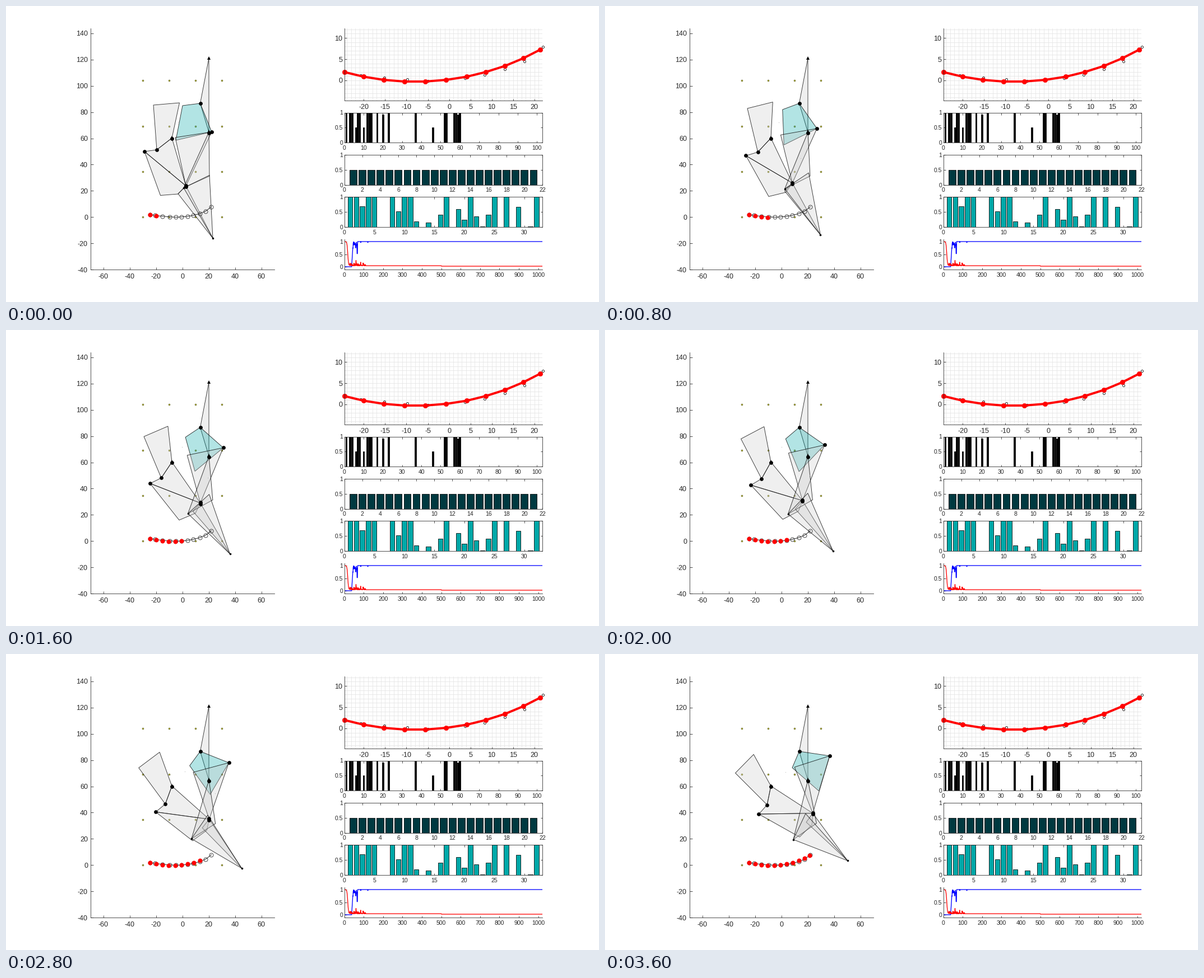
Recreate the animation shown at these times as a matplotlib script. Size 1058x529 px, loop 4000 ms.

```python
import numpy as np
import matplotlib.pyplot as plt
from matplotlib.animation import FuncAnimation
from matplotlib.patches import Polygon

W, H, DPI = 1058, 529, 100
PX = 72 / DPI  # points per pixel
INK = "#262626"
TEAL = (0, 0.66, 0.66)

plt.rcParams.update({
    "font.family": "Liberation Sans",
    "axes.unicode_minus": False,
    "axes.edgecolor": INK,
    "axes.linewidth": 0.8 * PX,
    "axes.axisbelow": True,
})
fig = plt.figure(figsize=(W / DPI, H / DPI), dpi=DPI, facecolor="white")


def panel(box, xlim, ylim, xticks, yticks, size, pads, framed=True, tick=3.5):
    """Axes with pixel bounds (left, top, right, bottom)."""
    l, t, r, b = box
    ax = fig.add_axes([l / W, 1 - b / H, (r - l) / W, (b - t) / H])
    ax.set(xlim=xlim, ylim=ylim)
    ax.set_xticks(xticks, [f"{v:g}" for v in xticks])
    ax.set_yticks(yticks, [f"{v:g}" for v in yticks])
    ax.tick_params(direction="in", length=tick * PX, width=0.8 * PX, color=INK,
                   labelcolor=INK, labelsize=size * PX, top=framed, right=framed)
    ax.tick_params(axis="x", pad=pads[0] * PX)
    ax.tick_params(axis="y", pad=pads[1] * PX)
    ax.spines[["top", "right"]].set_visible(framed)
    return ax


# Path of the foot and the wanted curve
path = np.array([(-24.6, 1.97), (-20, 0.86), (-15.3, 0.13), (-10.5, -0.26),
                 (-5.6, -0.26), (-0.7, 0.13), (4.1, 0.86), (8.6, 1.97),
                 (13.1, 3.4), (17.4, 5.2), (21.4, 7.24)])
goal = np.array([(-24.6, 1.97), (-20.7, 1.2), (-15.2, 0.65), (-9.8, 0.2),
                 (-4.9, -0.1), (-0.8, 0.1), (3.75, 0.5), (8.3, 1.3),
                 (13.1, 2.6), (17.7, 4.5), (22, 7.9)])

# Right column
fit = panel((603.5, 40, 957, 169), (-24.6, 21.9), (-4.74, 12.24),
            range(-20, 21, 5), (0, 5, 10), 12.5, (6.5, 3.5), framed=False)
fit.set_xticks(range(-24, 22), minor=True)
fit.set_yticks(range(-4, 13), minor=True)
fit.tick_params(which="minor", length=0)
fit.grid(which="both", color="#e4e4e4", lw=0.8 * PX)
fit.plot(*goal[1:].T, "o", ms=4 * PX, mfc="none", mec="k", mew=0.8 * PX, clip_on=False)
fit.plot(*path.T, "o-", color="red", lw=4 * PX, ms=8.5 * PX, mec="red",
         mew=0.5 * PX, clip_on=False)


def bars(box, xmax, xticks, heights, color, width=0.8):
    ax = panel(box, (0, xmax), (0, 1), xticks, (0, 0.5, 1), 10.4, (5, 2.5))
    ax.bar(list(heights), list(heights.values()), width, color=color,
           edgecolor="k", lw=0.8 * PX)


flags = dict.fromkeys((1, 3, 4, 7, 8, 12, 13, 14, 17, 23, 37, 52, 53, 57, 58, 60), 1)
flags.update({6: 0.5, 10: 0.5, 46: 0.5, 20: 0.94, 59: 0.94})
bars((603.5, 190.5, 957, 244), 102.8, range(0, 101, 10), flags, "k")
bars((603.5, 266, 957, 319.5), 22, range(0, 23, 2),
     dict.fromkeys(range(1, 22), 0.5), (0, 0.225, 0.25))
genes = dict.fromkeys((1, 2, 4, 5, 8, 10, 11, 17, 21, 25, 27, 32), 1)
genes.update({3: 0.68, 9: 0.52, 12: 0.18, 14: 0.15, 16: 0.4, 19: 0.6, 20: 0.25,
              22: 0.35, 23: 0.01, 24: 0.4, 29: 0.67, 31: 0.02})
bars((603.5, 341, 957, 395), 33, range(0, 31, 5), genes, TEAL)

log = panel((603.5, 416.5, 957, 470.5), (0, 1021), (-0.1, 1.1),
            range(0, 1001, 100), (0, 0.5, 1), 10.4, (5, 2.5), framed=False)
rng = np.random.default_rng(4)
n = np.arange(1021)
score = np.clip((n - 38) / 8, 0, 1)
early = (n > 44) & (n < 68)
score[early] -= 0.15 * rng.random(early.sum())
score[[59, 60]], score[[66, 67, 68]], score[[85, 121, 122]] = 0.75, 0.52, 0.96
error = 0.04 + 0.96 / (1 + np.exp((n - 18) / 2))
rough = (n > 24) & (n < 112)
error[rough] += 0.11 * rng.random(rough.sum()) ** 3
error[[60, 61]], error[[84, 85]], error[[97]] = 0.25, 0.18, 0.15
error[n > 500] -= 0.018
log.plot(n, score, color="blue", lw=1.3 * PX)
log.plot(n, error, color="red", lw=1.3 * PX)

# Left plot
main = panel((150.5, 40, 479, 471), (-70, 70), (-40, 143.8),
             range(-60, 61, 20), range(-40, 141, 20), 12.5, (7, 4.5),
             framed=False, tick=4.5)
gx, gy = np.meshgrid((-30, -10, 10, 30), (0, 34.7, 69.3, 104))
main.plot(gx.ravel(), gy.ravel(), "o", ms=2.6 * PX, mfc="#e0e040", mec="#55551a",
          mew=0.8 * PX)

# Linkage, in stage pixels with y down
stage = fig.add_axes([0, 0, 1, 1])
stage.set(xlim=(0, W), ylim=(H, 0))
stage.axis("off")

TOP, B, C, D = 362 + 93j, 346.5 + 174j, 362 + 225.5j, 296 + 236j
G0, E0, T0, K0 = 367 + 225j, 321 + 321.5j, 369 + 415j, 317 + 325j
CUP = (315 + 178j, 303 + 240j)
HIP, HEEL = 302 + 235j, 307 + 335.5j
SHIN, TOE = 363 + 304j, 363 + 302.5j
WING = (263 + 177j, 309.5 + 173j)
J1, J2, LOW, BACK = 269 + 257j, 247 + 260j, 275.5 + 338.5j, 307 + 336j
STEP = -59.7 / 9


def meet(a, ra, b, rb):
    """Pin held at ra from a and rb from b."""
    d = abs(b - a)
    x = (ra * ra - rb * rb + d * d) / (2 * d)
    return a + (b - a) / d * complex(x, (ra * ra - x * x) ** 0.5)


def carry(a0, b0, a, b):
    """Rigid move taking segment a0-b0 onto a-b."""
    turn = (b - a) / (b0 - a0)
    turn /= abs(turn)
    return lambda p: a + (p - a0) * turn


def pose(k):
    spin = np.exp(1j * np.radians(STEP * k))
    G = B + (G0 - B) * spin
    E = meet(D, abs(E0 - D), G, abs(E0 - G0))
    rod = carry(G0, E0, G, E)
    T = rod(T0)
    K = meet(C, abs(K0 - C), T, abs(K0 - T0))
    arm, leg, foot = carry(D, E0, D, E), carry(C, K0, C, K), carry(K0, T0, K, T)
    j1, j2 = arm(J1), arm(J2)
    shapes = [
        [TOP, B, C],
        [B] + [B + (p - B) * spin for p in CUP] + [G],
        [arm(WING[0]), arm(WING[1]), D, j1],
        [D, j1, j2, E],
        [j2, arm(LOW), arm(BACK), E],
        [G, rod(HIP), E],
        [E, rod(HEEL), T],
        [C, leg(SHIN), K],
        [K, foot(TOE), T],
    ]
    joints = [B, C + 1j, D + 0.5j, G, E - 0.8j, E + 1.5j, j1, j2]
    specks = [307 + 1.65 * k + (207 + 0.4 * k) * 1j, rod(337 + 277j)]
    return shapes, joints, [K, T], specks


def xy(points):
    return np.array([(p.real, p.imag) for p in points])


polys = []
for i in range(9):
    face = TEAL + (0.3,) if i == 1 else (0.8, 0.8, 0.8, 0.3)
    poly = Polygon([(0, 0), (1, 0), (1, 1)], closed=True, fc=face,
                   ec=(0, 0, 0, 0.8), lw=0.9 * PX, joinstyle="miter")
    polys.append(stage.add_patch(poly))


def marks(size, color="k"):
    return stage.plot([], [], "o", ms=size * PX, color=color, mew=0)[0]


joints, pins, specks = marks(6.8), marks(3.6), marks(1.1, "#aaaaaa")
stage.plot(*xy([TOP, C - 1.5j, D - 1j]).T, "^", color="k", ms=6.6 * PX, mew=0)


def to_stage(pts):
    return 314.8 + 2.346 * pts[:, 0], 377.2 - 2.344 * pts[:, 1]


stage.plot(*to_stage(goal), "o-", color="k", lw=0.8 * PX, ms=7 * PX, mfc="none",
           mec="#222222", mew=0.8 * PX)
done = marks(8, "red")


def draw(k):
    shapes, big, small, tiny = pose(k)
    for poly, pts in zip(polys, shapes):
        poly.set_xy(xy(pts))
    for line, pts in ((joints, big), (pins, small), (specks, tiny)):
        line.set_data(*xy(pts).T)
    done.set_data(*to_stage(path[:k + 2]))
    return [*polys, joints, pins, specks, done]


anim = FuncAnimation(fig, draw, frames=10, interval=400, repeat=True, repeat_delay=0)
plt.show()
```
